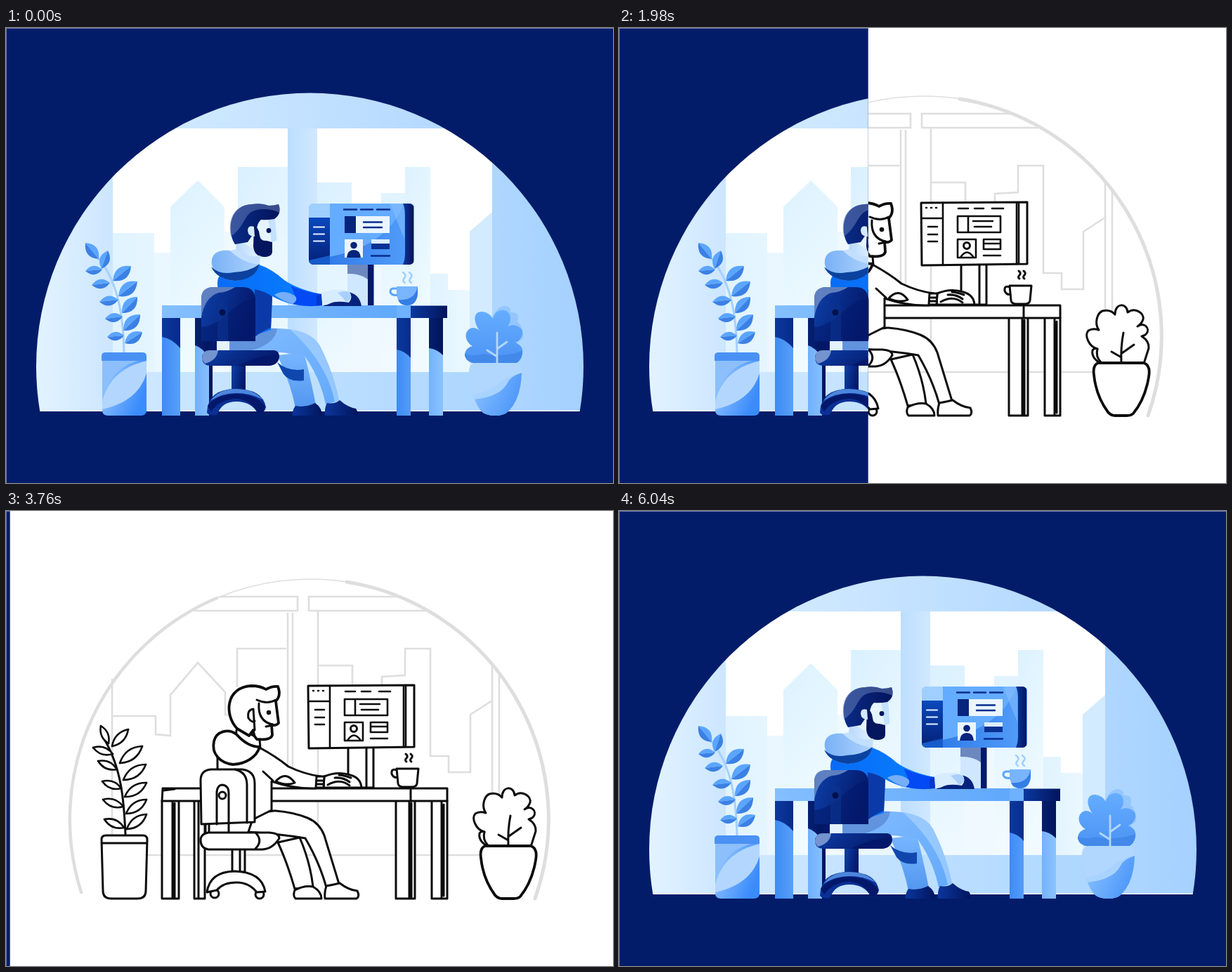
Write an HTML page that moves like this. It is 864 px wide and 648 px high and loops after 6920 ms.

```html
<!DOCTYPE html>
<html lang="en">
<head>
<meta charset="utf-8">
<title>Desk scene wipe</title>
<style>
html, body { margin: 0; width: 100%; height: 100%; overflow: hidden; background: #fff; }
svg { position: absolute; left: 0; top: 0; width: 864px; height: 648px; display: block; }
.ink { stroke: #0c0c0c; stroke-width: 3; fill: #fff; stroke-linecap: round; stroke-linejoin: round; }
.ink .open { fill: none; }
.ink .bold { stroke-width: 3.8; }
.pale { stroke: #dedede; stroke-width: 2.6; fill: none; stroke-linecap: round; }
</style>
</head>
<body>

<svg id="sketch" viewBox="0 0 864 648">
  <g class="pale">
    <path d="M107 543A342 342 0 0 1 300 124" stroke-width="4.5"/>
    <path d="M300 124A342 342 0 0 1 486 101" stroke-width="1.5"/>
    <path d="M485 101A342 342 0 0 1 753 552" stroke-width="5"/>
    <path d="M305 122H415V142H268M562 122H431V142H600M401 146V395M408 146V395M444 144V395M692 220V490M702 230V490M151 240V470M190 490H690M444 414V490"/>
    <path d="M151 292H213V318L234 320V262L273 216 312 258V290H318M329 250V196H398M444 220H493V246M535 248V236L568 234V196H604V349H630V372H661V290L692 270"/>
  </g>
  <g class="ink">
    <!-- left plant -->
    <path class="open" d="M170 460C168 415 165 365 138 322"/>
    <g id="sketchLeaves" stroke-width="2.6"></g>
    <path d="M142 462H195Q201 462 201 468L199 541Q199 552 187 552H150Q138 552 138 541L136 468Q136 462 142 462Z"/>
    <path class="open" d="M137 473H200"/>
    <!-- desk -->
    <path d="M222 413V552H246V413M268 413V552H283V413M555 413V552H582V413M606 413V552H628V413"/>
    <path class="open" d="M237 414V551M240 416V550M274 414V551M574 414V551M577 416V550M620 414V551M623 418V548"/>
    <path d="M223 395H628V413H222Z"/>
    <path class="open" d="M576 397V413M224 398L240 396"/>
    <!-- monitor -->
    <path d="M487 337V394H523V337M513 338V393"/>
    <path d="M430 249L581 248V336L431 338Z"/>
    <path class="open" stroke-width="2.6" d="M461 249V337M566 249V336M431 271H461M569 249V335M437 256h1M444 256h1M451 256h1M440 283h13M440 294h13M440 304h13M483 257h14M506 257h13M531 257h16M482 268H543V291H482ZM497 268V291M504 275h28M506 283h24M482 301H508V327H482ZM519 301H543V315H519ZM519 307H543M519 324h24M486 327Q495 312 505 327"/>
    <circle cx="495" cy="310" r="4.5"/>
    <!-- cup -->
    <path class="open" d="M557 369Q548 366 549 374Q551 381 559 379M569 346q4 3 1 6t0 5M576 346q4 3 1 6t0 5"/>
    <path d="M556 367H587L585 388Q584 393 578 393H565Q559 393 558 388Z"/>
    <!-- legs -->
    <path d="M387 472Q400 500 411 538L437 535Q433 500 418 465Z"/>
    <path d="M411 540Q424 533 437 535Q449 542 449 552H412Q408 548 411 540Z"/>
    <path d="M350 442Q366 426 384 427Q409 429 429 437Q446 444 453 462L474 531 456 536Q446 500 426 466Q390 460 345 457Z"/>
    <path d="M456 534Q467 532 475 530Q488 540 500 541Q504 549 499 552H454Q453 543 456 534Z"/>
    <!-- body and arm -->
    <path d="M301 370V352L361 337Q385 350 402 364Q425 375 448 378L441 395Q410 396 378 385V426L350 440 301 440Z"/>
    <path class="open" d="M366 371L380 384M384 385Q398 369 411 387Q400 392 384 385"/>
    <path d="M453 378Q472 370 490 376Q505 380 506 394L452 394Z"/>
    <path d="M442 378H453L452 394H441Z"/>
    <path class="open" d="M442 384h10M442 389h10M468 380q12 -1 21 6M458 390Q475 380 489 391M491 380Q480 376 474 376"/>
    <!-- head -->
    <path d="M329 307L326 326 362 338 361 325Z"/>
    <path class="bold" d="M329 310C310 290 313 251 349 249Q362 249 370 254Q379 249 387 250Q392 263 384 271L388 302Q383 307 378 304L379 319Q377 327 357 325Q352 320 352 312L346 320Z"/>
    <path class="open" d="M384 269Q372 276 357 269M360 274Q358 299 379 304M352 282Q343 283 345 295Q350 302 354 299M352 282L354 312M380 305L370 307"/>
    <circle cx="374" cy="287" r="1.8" fill="#0c0c0c"/>
    <path class="bold" d="M328 318C316 309 299 314 296 328C292 346 305 359 323 361C342 360 357 350 361 336Q344 336 328 318Z"/>
    <!-- chair -->
    <path d="M284 447V459M289 447V459M322 481V514H340V481M333 482V512"/>
    <path d="M278 446L277 384Q277 369 292 368H336Q354 370 354 388V443Z"/>
    <path class="open" d="M326 368Q343 372 343 390V444M300 446V400Q301 390 308 390Q317 391 317 402V459"/>
    <circle cx="308" cy="405" r="5"/>
    <path d="M288 458H375Q389 459 389 466Q380 481 365 482H288Q277 480 277 469Q277 460 288 458Z"/>
    <path class="open" d="M356 459Q366 470 355 481"/>
    <circle cx="297" cy="545" r="6"/><circle cx="361" cy="546" r="6"/>
    <path d="M286 543Q290 514 325 513Q364 514 369 542L357 543Q346 529 328 529Q309 529 300 540Z"/>
    <!-- right plant -->
    <path d="M686 478Q672 470 674 459Q677 455 681 457C669 454 662 438 668 431Q674 427 683 430C676 420 681 406 688 403Q699 400 706 408C706 391 723 391 724 405C734 397 748 406 746 415Q744 421 738 425C748 418 756 428 751 435Q749 438 744 439Q755 446 754 456L747 478Z"/>
    <path class="open" d="M681 457Q678 468 686 476M715 477Q714 454 718 434M701 461L715 469M733 451L716 463"/>
    <path class="bold" d="M682 477H747Q757 480 754 497Q749 528 732 549Q729 552 723 552H705Q699 551 696 547Q679 524 676 494Q674 480 682 477Z"/>
  </g>
</svg>

<svg id="scene" viewBox="0 0 864 648">
  <defs id="defs"></defs>
  <rect width="864" height="648" fill="#031c69"/>
  <path d="M0 .5H864M.5 0V648" stroke="#6d7bb0"/>
  <g clip-path="url(#domeClip)">
    <rect x="43" y="92" width="779" height="454" fill="url(#dome)"/>
    <path d="M43 92H152V546H43Z" fill="url(#pillar)"/>
    <path d="M152 143H401V490H152ZM443 143H692V490H443Z" fill="#fff"/>
    <path d="M330 198H401V490H330Z" fill="url(#tower)"/>
    <path d="M152 292H211V320H234V255L273 217 311 255V290H330V490H152Z" fill="url(#town)"/>
    <path d="M234 255L273 217 311 255V490H234Z" fill="url(#house)"/>
    <path d="M211 320H234V490H211ZM340 330H401V490H340Z" fill="#eaf7ff"/>
    <path d="M443 220H492V250H534V235H568V198H604V490H443Z" fill="url(#tower)"/>
    <path d="M568 198H604V490H568Z" fill="url(#house)"/>
    <path d="M492 250H534V490H492Z" fill="#eff9ff"/>
    <path d="M604 350H629V373H660V290L692 262V490H604Z" fill="url(#town)"/>
    <path d="M660 290L692 262V490H660Z" fill="#d3ebff"/>
    <rect x="401" y="143" width="42" height="347" fill="url(#post)"/>
    <rect x="152" y="490" width="540" height="56" fill="url(#sill)"/>
    <path d="M43 545.2H822" stroke="#f6fbff" stroke-width="1.6"/>
  </g>

  <!-- left plant -->
  <path d="M168 463C167 420 163 362 128 324" fill="none" stroke="#a6d0ff" stroke-width="3"/>
  <g id="leaves"></g>
  <path d="M137 472H200V544Q200 552 192 552H145Q137 552 137 544Z" fill="url(#pot)"/>
  <path d="M137 472H199Q148 478 137 534Z" fill="#8cbffb"/>
  <path d="M200 474V492Q188 532 137 543V532Q148 486 200 474Z" fill="#b3d6ff"/>
  <path d="M136 474V467Q136 462 142 462H194Q200 462 200 467V474Z" fill="#4a91f4"/>

  <!-- desk -->
  <path d="M222 413H248V552H222ZM269 413H294V552H269Z" fill="url(#leg)"/>
  <path d="M556 413H576V552H556ZM602 413H622V552H602Z" fill="url(#leg)"/>
  <path d="M222 413H248V456Q236 442 222 440ZM269 413H294V552H289V470Q280 455 269 452Z" fill="url(#navy)"/>
  <path d="M556 413H576V470Q568 460 556 458ZM602 413H622V466Q613 457 602 456Z" fill="url(#navy)"/>
  <rect x="222" y="395" width="355" height="18" fill="url(#board)"/>
  <rect x="576" y="395.500" width="52" height="17.500" fill="url(#navy)"/>
  <path d="M556 413V395H576V413Z" fill="#6eb1ff"/>

  <!-- monitor -->
  <rect x="486" y="337" width="29" height="58" fill="#cfe7ff"/>
  <path d="M486 337H515V358Q503 349 486 350Z" fill="#6d88bf"/>
  <rect x="515" y="337" width="8.500" height="58" fill="#03196a"/>
  <g clip-path="url(#screenClip)">
    <rect x="431" y="250" width="150" height="87" fill="#64acff"/>
    <path d="M431 330Q540 320 566 250H581V337H431Z" fill="url(#glare)"/>
    <rect x="431" y="250" width="30" height="21" fill="#9fcfff"/>
    <rect x="431" y="270" width="30" height="67" fill="url(#side)"/>
    <path d="M431 331Q447 327 461 324V337H431Z" fill="#155bc9"/>
    <path d="M565 250H580V337H565Q568 330 568 322V265Q568 256 565 250Z" fill="url(#navy)"/>
    <path d="M547 250H565Q567 256 567 265V300Q556 275 547 250Z" fill="#8cc4ff" opacity=".5"/>
  </g>
  <path d="M481 258.500h18M505 258.500h17M528 258.500h18M520 324.500h26" stroke="#0a2c8c" stroke-width="2.4" stroke-linecap="round"/>
  <path d="M438 283.500h15M438 293.500h15M438 303.500h15" stroke="#e8f4ff" stroke-width="2.2" stroke-linecap="round"/>
  <rect x="482" y="268" width="16" height="24" fill="#07257f"/>
  <rect x="498" y="268" width="48" height="24" fill="#eaf5ff"/>
  <path d="M509 276.500h26M509 284h26" stroke="#0a2c8c" stroke-width="2.4" stroke-linecap="round"/>
  <rect x="482" y="301" width="26" height="26" fill="#eaf5ff"/>
  <path d="M485 327Q486 316 495 316T505 327Z" fill="#07237c"/>
  <circle cx="495" cy="309.500" r="4.800" fill="#07237c"/>
  <rect x="520" y="302" width="26" height="13" fill="#0a3192"/>
  <rect x="520" y="301" width="26" height="6" fill="#dceeff"/>

  <!-- cup -->
  <path d="M558 371H551Q547 371 547 376Q549 382 559 380" fill="none" stroke="#5ba5fb" stroke-width="3"/>
  <path d="M556 368H586V379Q584 395 571 395T556 379Z" fill="#78b5fc"/>
  <path d="M586 368V379Q584 395 571 395Q561 395 558 387Q582 389 586 368Z" fill="#347ee4"/>
  <path d="M565 348q6 4 2 8t1 7M574 348q6 4 2 8t1 7" fill="none" stroke="#a0cfff" stroke-width="2.6" stroke-linecap="round"/>

  <!-- legs -->
  <path d="M386 466L424 462Q434 500 441 537L412 541Q405 505 386 466Z" fill="url(#shin)"/>
  <path d="M386 476Q402 490 424 486V502Q404 505 395 493Z" fill="#0f47ae"/>
  <path d="M412 538Q426 541 440 534Q450 541 450 552H408Q407 545 412 538Z" fill="url(#shoe)"/>
  <path d="M318 446Q350 424 390 428Q434 430 447 453Q466 490 474 531L455 536Q448 500 425 467Q390 459 318 460Z" fill="url(#trouser)"/>
  <path d="M318 446Q345 427 386 428Q383 450 350 459L318 460Z" fill="#6293dd"/>
  <path d="M404 429Q436 433 447 453Q466 490 474 531L468 533Q458 478 404 429Z" fill="#a5d0ff" opacity=".75"/>
  <path d="M457 534Q468 536 475 530Q486 540 498 542Q502 548 500 552H454Q453 541 457 534Z" fill="url(#shoe)"/>

  <!-- mouse, hand, body -->
  <path d="M452 396Q456 386 472 386L486 376Q503 378 506 396Z" fill="#05237c"/>
  <path d="M446 378Q470 369 488 375Q495 383 488 391Q470 388 462 392Q453 397 446 394Z" fill="#d8ecff"/>
  <path d="M472 377Q488 372 491 380Q491 388 484 390Q478 382 472 377Z" fill="#a9cfff"/>
  <path d="M301 364Q301 350 312 350L360 337Q378 343 396 359Q415 372 448 379L450 395Q410 400 379 382L377 430Q340 444 305 440Z" fill="url(#jacket)"/>
  <path d="M354 372Q372 376 379 383L377 427Q364 432 354 440Z" fill="#0b3aa8"/>
  <path d="M405 367Q426 376 448 379L450 395Q428 398 408 393Q416 386 405 367Z" fill="#0349f4"/>
  <path d="M382 380Q396 371 412 382Q416 388 408 393Q393 389 382 380Z" fill="#76aef8"/>
  <path d="M449 378.500L442 381V395H450Z" fill="#0638cf"/>

  <!-- head -->
  <path d="M328 300L327 324Q338 338 362 335L361 320Z" fill="url(#skin)"/>
  <path d="M345 272H383L385.500 302Q382 305 378 305L360 312 345 305Z" fill="#e6f4ff"/>
  <path d="M373 271H383L385.500 302Q382 305 378 305Z" fill="#c4e1ff"/>
  <path d="M326 308C314 290 317 252 350 251Q364 249 374 253Q382 253 388 251Q393 265 382 272Q371 274 363 273Q358 277 357 286L344 305Z" fill="url(#hair)"/>
  <path d="M353 282Q360 284 361 295Q362 304 371 303L379 305V318Q379 326 367 326Q353 325 352 311Z" fill="#03165e"/>
  <path d="M320 297C315 272 324 252 350 251Q364 249 374 253Q382 253 388 251Q391 258 389 263Q375 256 357 259C338 263 342 281 320 297Z" fill="#6d84bb" opacity=".5"/>
  <path d="M353 283Q344 280 344 289Q345 297 354 297Z" fill="#d5eaff"/>
  <circle cx="374" cy="288.500" r="3.400" fill="#03165e"/>
  <path d="M293 337C291 321 302 315 319 317Q337 335 361 336Q356 357 326 360Q298 358 293 337Z" fill="url(#hood)"/>
  <path d="M292 340Q304 352 324 348Q347 347 361 336Q356 358 326 360Q300 358 292 340Z" fill="#0b429f"/>
  <path d="M319 317Q337 335 361 336L362 324Q345 329 328 315Z" fill="#c3dfff"/>

  <!-- chair -->
  <path d="M289 440H300V466H289Z" fill="#03186a"/>
  <path d="M300 444H316V462H300Z" fill="#e4f3ff"/>
  <path d="M278 446V386Q278 369 296 369H338Q355 370 355 388V446Z" fill="url(#seat)"/>
  <path d="M278 446V426Q298 424 318 405T355 385V388 446Z" fill="#03186a" opacity=".55"/>
  <path d="M278 412V386Q278 369 296 369H326Q316 376 303 377Q283 383 278 412Z" fill="#6e8cc7" opacity=".85"/>
  <path d="M301 446V400Q302 390 308 390Q316 391 316 400V446Z" fill="#0b338f" opacity=".6"/>
  <circle cx="308" cy="405" r="4.500" fill="#02114d"/>
  <rect x="321" y="480" width="20" height="36" fill="url(#seat)"/>
  <path d="M290 459H382Q389 460 389 468Q388 480 374 481H290Q279 480 279 470T290 459Z" fill="url(#seat)"/>
  <path d="M279 472Q279 459 290 459H302Q300 474 283 478Z" fill="#7493cf"/>
  <path d="M330 481Q360 465 389 466Q388 480 374 481Z" fill="#03186a"/>
  <path d="M286 548Q287 514 327 514Q365 514 370 540Q368 549 359 550Q350 532 328 532Q307 532 301 550Q291 554 286 548Z" fill="#0a3095"/>
  <path d="M287 538Q300 521 328 521Q356 521 369 539Q368 549 359 550Q350 530 328 528Q304 529 292 546Z" fill="#03186a"/>
  <path d="M291 531Q303 514 327 514Q353 514 365 529Q348 520 328 520T291 531Z" fill="#4c86dc"/>

  <!-- right plant -->
  <path d="M690 420Q695 398 709 396Q719 396 718 405Q732 404 728 418Q738 428 736 442L712 460Z" fill="#94c5fd"/>
  <path d="M670 478Q653 476 653 464Q655 455 664 453C650 444 653 429 664 427Q670 427 674 431C663 415 667 403 678 404Q688 405 693 414C696 400 712 398 717 408Q720 417 714 425C725 420 737 427 735 436Q733 445 725 448Q737 453 735 464Q733 475 724 478Z" fill="url(#bush)"/>
  <path d="M670 478Q653 476 653 464Q662 468 680 464Q704 470 735 460Q735 474 724 478Z" fill="#4389ea"/>
  <path d="M699 479V434M685 459L699 468M713 447L699 457" fill="none" stroke="#b2d6ff" stroke-width="2.8" stroke-linecap="round"/>
  <path d="M669 477H726Q735 479 734 493Q733 528 715 546Q709 552 696 552Q681 552 675 544Q660 524 659 490Q659 478 669 477Z" fill="#a8d2ff"/>
  <path d="M734 491Q733 528 715 546Q709 552 696 552Q681 552 675 544Q670 537 667 529Q704 525 714 505Q718 496 734 491Z" fill="url(#potR)"/>
  <path d="M659 491Q659 478 669 477H726Q735 479 734 491Q716 494 705 503Q686 520 664 522Q659 506 659 491Z" fill="#b7daff" opacity=".7"/>
</svg>

<script>
const $ = id => document.getElementById(id);

// id, start colour, end colour, x2, y2
const grads = [
  ['dome', '#dff1ff', '#a5d1ff', 1, 0], ['pillar', '#e2f3ff', '#cce6ff', 1, 0],
  ['tower', '#d9f0ff', '#f0faff', 0.4, 1], ['town', '#e0f3ff', '#f0faff', 1, 0],
  ['house', '#dcf2ff', '#f1fbff', 0.3, 1], ['post', '#bcdeff', '#d1e8ff', 1, 0],
  ['sill', '#d0e9ff', '#acd6ff', 1, 0], ['pot', '#a0cdff', '#3a8bfc', 1, 0.5],
  ['leg', '#3d8bf4', '#8bc3ff', 1, 0], ['navy', '#0b389f', '#02145c', 1, 0],
  ['board', '#84bfff', '#5ea7fb', 1, 0], ['glare', '#2874e6', '#559ffa', 1, 0],
  ['side', '#0a48bd', '#042078', 0, 1], ['shin', '#78b6ff', '#5297ef', 0, 1],
  ['shoe', '#0b369c', '#02155d', 1, 0], ['trouser', '#82bcff', '#63a9fa', 1, 1],
  ['jacket', '#086cf6', '#087fff', 1, 0], ['skin', '#b7d8fb', '#e4f2ff', 1, 0],
  ['hair', '#0a2b86', '#02145b', 1, 0], ['hood', '#79b1f6', '#afd3fd', 1, 0],
  ['seat', '#0d40a9', '#04196b', 1, 0.3], ['bush', '#65adff', '#4c93f4', 0, 1],
  ['potR', '#8cc2ff', '#4f99fa', 1, 0.4]
];
$('defs').innerHTML =
  '<clipPath id="domeClip"><path d="M0 0H864V546H0Z" clip-path="url(#ring)"/></clipPath>' +
  '<clipPath id="ring"><circle cx="432.5" cy="482" r="389.5"/></clipPath>' +
  '<clipPath id="screenClip"><rect x="431" y="250" width="150" height="87" rx="7"/></clipPath>' +
  grads.map(([id, a, b, x, y]) =>
    `<linearGradient id="${id}" x2="${x}" y2="${y}"><stop stop-color="${a}"/>` +
    `<stop offset="1" stop-color="${b}"/></linearGradient>`).join('');

// One side of a leaf running from base to tip, bulging by k.
function side([x1, y1, x2, y2], k) {
  const cx = (x1 + x2) / 2 - (y2 - y1) * k, cy = (y1 + y2) / 2 + (x2 - x1) * k;
  return `M${x1} ${y1}Q${cx} ${cy} ${x2} ${y2}`;
}

const leaves = [
  [132, 329, 113, 306], [137, 344, 113, 346], [148, 363, 122, 366], [160, 387, 133, 390],
  [166, 411, 141, 414], [168, 438, 144, 440], [136, 343, 145, 317], [152, 360, 178, 339],
  [160, 382, 187, 361], [165, 406, 187, 383], [167, 431, 191, 408], [169, 449, 194, 433]
];
$('leaves').innerHTML = leaves.map(l => {
  const up = l[2] < l[0] ? 0.52 : -0.52;
  return `<path d="${side(l, up)}Z" fill="#5ba5ff"/><path d="${side(l, -up)}Z" fill="#3b80e4"/>`;
}).join('');

const inkLeaves = [
  [146, 331, 135, 306], [152, 346, 124, 337], [158, 368, 131, 356], [164, 395, 137, 385],
  [167, 421, 138, 411], [168, 451, 140, 439], [151, 335, 174, 311], [162, 359, 194, 335],
  [167, 383, 199, 361], [169, 407, 200, 387], [171, 431, 200, 411], [172, 453, 200, 432]
];
$('sketchLeaves').innerHTML = inkLeaves.map(l =>
  `<path d="${side(l, 0.34)}"/><path d="${side(l, -0.34)}"/>`).join('');

const LOOP = 6920, STEP = 20, RUN = 2400, OUT = 1000, BACK = 3640, WIDTH = 864;
const bez = (s, a, b) => 3 * (1 - s) * (1 - s) * s * a + 3 * (1 - s) * s * s * b + s * s * s;

function ease(u) {
  if (u <= 0) return 0;
  if (u >= 1) return 1;
  let lo = 0, hi = 1;
  for (let i = 0; i < 30; i++) {
    const mid = (lo + hi) / 2;
    if (bez(mid, 0.6, 0.1) < u) lo = mid; else hi = mid;
  }
  return bez(lo, 0.05, 0.99);
}

function draw() {
  const t = Math.floor(performance.now() % LOOP / STEP) * STEP;
  const shown = 1 - ease((t - OUT) / RUN) + ease((t - BACK) / RUN);
  const hidden = WIDTH * (1 - shown);
  $('scene').style.clipPath = `inset(0 ${hidden.toFixed(2)}px 0 0)`;
  requestAnimationFrame(draw);
}
draw();
</script>
</body>
</html>
```
